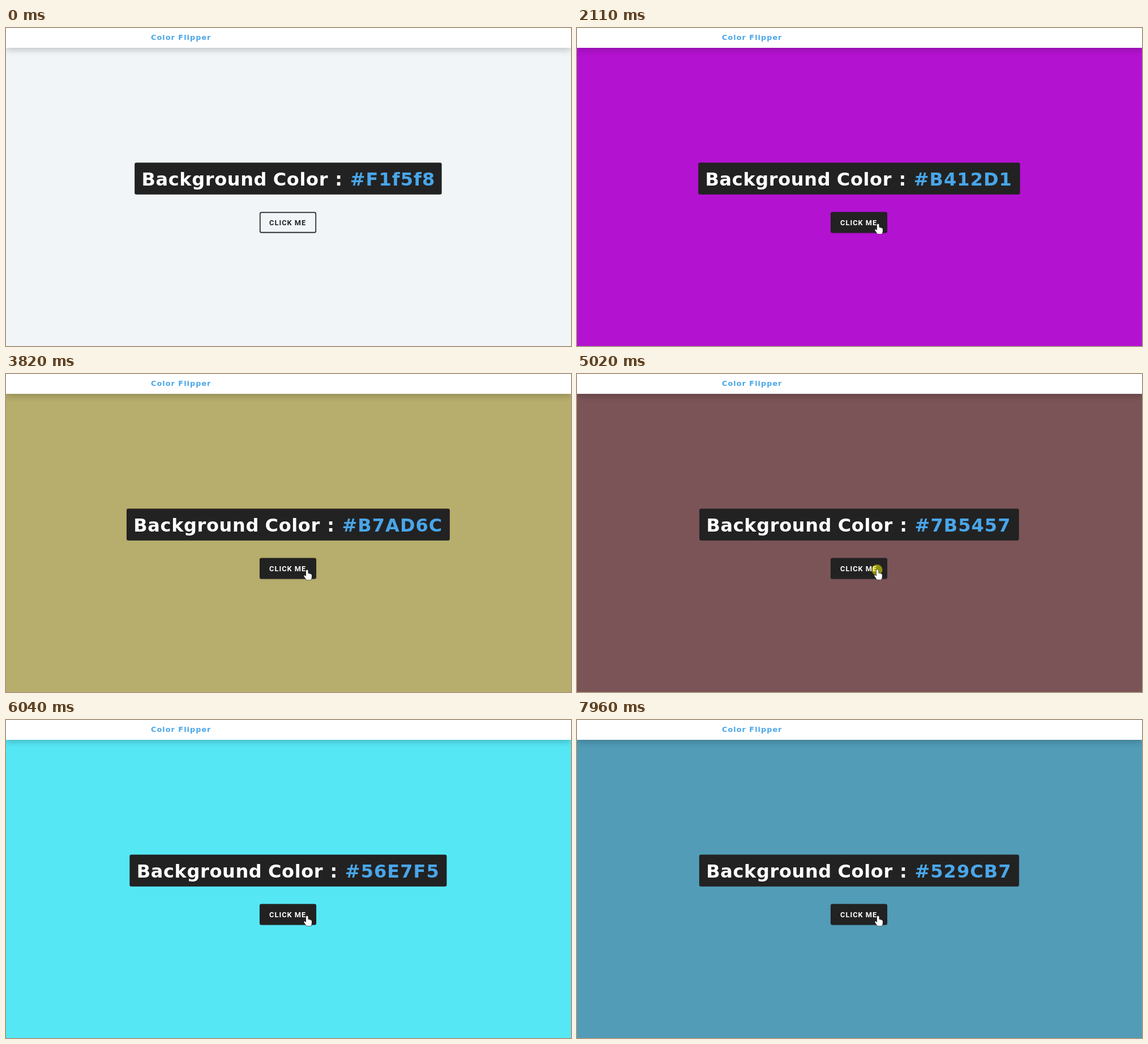
Recreate the animation shown at these times as an HTML page. Size 998 px wide and 561 px high, loop 8000 ms.

```html
<!DOCTYPE html>
<html lang="en">
<head>
<meta charset="utf-8">
<title>Color Flipper</title>
<style>
  html, body { margin: 0; width: 100%; height: 100%; overflow: hidden; }
  #stage { position: relative; width: 998px; height: 561px; overflow: hidden; background: #f1f5f8; }
  #stage > * { position: absolute; }
  nav { left: 0; top: 0; width: 998px; height: 35px; background: #fff; box-shadow: 0 4px 12px rgba(0, 0, 0, .2); }
  #shadow { left: 448px; top: 325px; width: 100px; height: 36px; border-radius: 3.2px;
            box-shadow: 0 1px 2px rgba(0, 0, 0, .2); }
  svg { left: 0; top: 0; }
  .logo { font: bold 12.8px "DejaVu Sans", sans-serif; letter-spacing: 1.04px; fill: #49a6e9; }
  .title { font: bold 32px "DejaVu Sans", sans-serif; letter-spacing: .62px; fill: #fff; }
  #hex { letter-spacing: 1.05px; fill: #49a6e9; }
  #label { font: 600 12.8px Roboto, sans-serif; letter-spacing: 1px; }
  .cursor { fill: #fff; stroke: #222; stroke-width: 1.2; paint-order: stroke; }
</style>
</head>
<body>
<div id="stage">
  <nav></nav>
  <div id="shadow"></div>
  <svg width="998" height="561">
    <text class="logo" x="256" y="21">Color Flipper</text>
    <rect id="box" y="237.5" height="56.2" rx="3.2" fill="#222"/>
    <g class="title" id="title">
      <text x="12.4" y="278.3">Background</text>
      <text x="244.6" y="278.3">Color</text>
      <text x="354.2" y="278.3">:</text>
      <text id="hex" x="380.5" y="278.3"></text>
    </g>
    <rect id="btn" x="448.8" y="325.4" width="98.4" height="35.2" rx="2.4" fill="#222" stroke="#222" stroke-width="1.6"/>
    <text id="label" x="465.1" y="347.5">CLICK ME</text>
    <circle id="press" cx="530" cy="345.5" r="9.5" fill="#ff0" fill-opacity=".5"/>
    <g id="pointer">
      <path id="arrow" class="cursor" d="M0 0V15L3.6 11.8L6 17L8.2 16L5.9 11H10.6Z"/>
      <path id="hand" class="cursor" d="M-2 1.5Q-2 -.5 -.2 -.5Q1.5 -.5 1.5 1.5V6Q3.2 5.2 4 6.5Q5.4 6 6.2 7.3Q8 7 8 9V12Q8 14.5 6.3 17.2H-1.2Q-3.5 14 -5.8 10.6Q-5.6 8.6 -3.8 9.4L-2 11Z"/>
    </g>
  </svg>
</div>
<script>
const LOOP = 8000, STEP = 100, ENTER = 200, HOVER = 600;
const HOME = { x: 532, y: 346 }, START = { x: 642, y: 470 };

// [time of flip, color, time the mouse goes down before the next flip]
const flips = [
  [0, "#F1f5f8", 900],
  [1000, "#3C9A5E", 2010],
  [2110, "#B412D1", 3010],
  [3110, "#2E73A8", null],
  [3820, "#B7AD6C", 4420],
  [4520, "#7B5457", 5020],
  [5120, "#C98A3D", 5420],
  [5540, "#6A4FB2", 5940],
  [6040, "#56E7F5", null],
  [6540, "#9D3B64", 6940],
  [7040, "#041F59", 7460],
  [7560, "#84B93F", 7860],
  [7960, "#529CB7", null]
];

// character widths in em; digits share the default
const EM = { "#": .867, A: .776, B: .762, C: .724, D: .83, E: .683, F: .65, f: .422 };
const boxWidth = hex => [...hex].reduce((w, c) => w + 32 * (EM[c] || .711), 398.7);

const el = id => document.getElementById(id);
const show = (id, on) => { el(id).style.display = on ? "" : "none"; };
const mix = (a, b, k) => a + (b - a) * k;
const clamp = v => Math.min(1, Math.max(0, v));

function draw(t) {
  const [, color, down] = flips.findLast(f => f[0] <= t);
  const pressed = down !== null && t >= down;
  const width = boxWidth(color), left = 498.4 - width / 2;

  el("stage").style.background = color;
  el("box").setAttribute("x", left);
  el("box").setAttribute("width", width);
  el("title").setAttribute("transform", `translate(${left} 0)`);
  if (el("hex").textContent !== color) el("hex").textContent = color;

  const tick = Math.floor(t / STEP) * STEP;
  const hover = clamp((tick - HOVER + STEP) / 300);
  const shade = Math.round(mix(34, 255, hover));
  el("btn").setAttribute("fill-opacity", hover);
  el("label").style.fill = `rgb(${shade}, ${shade}, ${shade})`;

  const k = 1 - (1 - clamp((tick - ENTER) / 600)) ** 2;
  const x = mix(START.x, HOME.x, k) - (pressed ? 1 : 0);
  const y = mix(START.y, HOME.y, k) - (pressed ? .5 : 0);
  el("pointer").setAttribute("transform", `translate(${x} ${y})`);
  show("pointer", t >= ENTER);
  show("arrow", t < HOVER);
  show("hand", t >= HOVER);
  show("press", pressed);
}

function frame() {
  draw(performance.now() % LOOP);
  requestAnimationFrame(frame);
}
frame();
</script>
</body>
</html>
```
